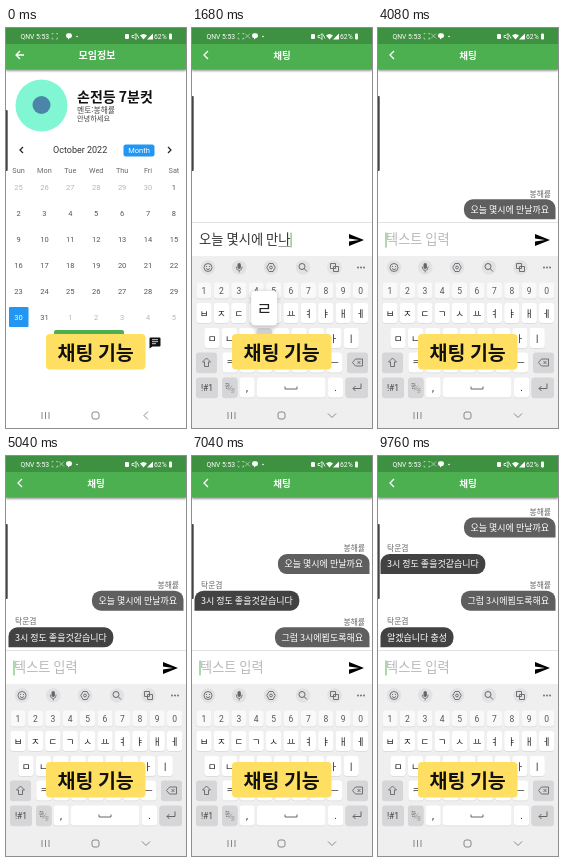
An HTML page with a canvas for the animation above (9.84 s loop, 180 px wide and 400 px high).

```html
<!DOCTYPE html>
<html lang="ko">
<head>
<meta charset="utf-8">
<style>
html, body { margin: 0; width: 100%; height: 100%; overflow: hidden; background: #fff; }
canvas { display: block; width: 180px; height: 400px; }
</style>
</head>
<body>
<canvas id="stage" width="180" height="400"></canvas>
<script>
const ctx = document.getElementById("stage").getContext("2d");
const LOOP = 9840, STEP = 80;
const KO = '"Noto Sans CJK KR", "Noto Sans CJK", sans-serif';
const LATIN = 'Roboto, "Noto Sans CJK KR", sans-serif';
const ME = "봉해률", PEER = "탁운겸";

const MESSAGES = [
  { at: 2240, me: true, text: "오늘 몇시에 만날까요" },
  { at: 4240, me: false, text: "3시 정도 좋을것같습니다" },
  { at: 6880, me: true, text: "그럼 3시에뵙도록해요" },
  { at: 9040, me: false, text: "알겠습니다 충성" }
];

// Drawing helpers
function text(str, x, y, size, color = "#222", { align = "left", weight = 400, font = KO } = {}) {
  ctx.font = `${weight} ${size}px ${font}`;
  ctx.textAlign = align;
  ctx.fillStyle = color;
  ctx.fillText(str, x, y + size * 0.37);
}
const center = (str, x, y, size, color, opts) => text(str, x, y, size, color, { align: "center", ...opts });
function box(x, y, w, h, color, radius = 0) {
  ctx.fillStyle = color;
  ctx.beginPath();
  ctx.roundRect(x, y, w, h, radius);
  ctx.fill();
}
function disc(x, y, r, color) {
  ctx.fillStyle = color;
  ctx.beginPath();
  ctx.arc(x, y, r, 0, 7);
  ctx.fill();
}
function path(d, x, y, color, width = 1, fill = false) {
  const shape = new Path2D(d);
  ctx.save();
  ctx.translate(x, y);
  ctx.lineWidth = width;
  ctx.strokeStyle = ctx.fillStyle = color;
  fill ? ctx.fill(shape) : ctx.stroke(shape);
  ctx.restore();
}
function shadow(color, blur, draw) {
  ctx.save();
  ctx.shadowColor = color;
  ctx.shadowBlur = blur;
  ctx.shadowOffsetY = 1;
  draw();
  ctx.restore();
}

// Hangul input: every key press with the text it leaves behind
const LEADS = "ㄱㄲㄴㄷㄸㄹㅁㅂㅃㅅㅆㅇㅈㅉㅊㅋㅌㅍㅎ";
const VOWELS = "ㅏㅐㅑㅒㅓㅔㅕㅖㅗㅘㅙㅚㅛㅜㅝㅞㅟㅠㅡㅢㅣ";
const TAILS = " ㄱㄲㄳㄴㄵㄶㄷㄹㄺㄻㄼㄽㄾㄿㅀㅁㅂㅄㅅㅆㅇㅈㅊㅋㅌㅍㅎ";
const syllable = n => String.fromCharCode(0xac00 + n);

function keystrokes(sentence) {
  const strokes = [];
  let done = "", prev = -1;
  for (const ch of sentence) {
    const code = ch.charCodeAt(0) - 0xac00;
    if (code < 0) {
      strokes.push({ key: ch, after: done + ch });
    } else {
      const lead = LEADS[Math.floor(code / 588)], tail = code % 28;
      const vowel = VOWELS[Math.floor(code % 588 / 28)], open = code - tail;
      const asTail = TAILS.indexOf(lead);
      const joins = prev >= 0 && prev % 28 === 0 && asTail > 0;
      strokes.push({ key: lead, after: joins ? done.slice(0, -1) + syllable(prev + asTail) : done + lead });
      if (vowel === "ㅚ") {
        strokes.push({ key: "ㅗ", after: done + syllable(open - 3 * 28) }, { key: "ㅣ", after: done + syllable(open) });
      } else {
        strokes.push({ key: vowel, after: done + syllable(open) });
      }
      if (tail) strokes.push({ key: TAILS[tail], after: done + ch });
    }
    done += ch;
    prev = code;
  }
  return strokes;
}
const TYPING = [
  { start: 800, pace: 45, end: MESSAGES[0].at, strokes: keystrokes(MESSAGES[0].text) },
  { start: 5200, pace: 52, end: MESSAGES[2].at, strokes: keystrokes(MESSAGES[2].text) }
];
function typed(t) {
  const run = TYPING.find(r => t >= r.start && t < r.end);
  if (!run) return { value: "", key: null };
  const i = Math.floor((t - run.start) / run.pace);
  const last = run.strokes[Math.min(i, run.strokes.length) - 1];
  return { value: last ? last.after : "", key: run.strokes[i] ? run.strokes[i].key : null };
}

// Shared chrome
function header(title, chat) {
  shadow("#0006", 2, () => box(0, 0, 180, 41.5, "#4caf50"));
  box(0, 0, 180, 16, "#3f9142");
  text("QNV", 14.5, 8.5, 6.8, "#fff", { font: LATIN });
  text("5:53", 30, 8.5, 6.8, "#fff", { font: LATIN });
  const faint = "#ffffffb0";
  path("M0 1V0H1.5M4 0H5.5V1M5.5 4V5.5H4M1.5 5.5H0V4", 46, 5.5, faint, .7);
  if (chat) path("M0 0L5 5M5 0L0 5", 53, 5.5, faint, .7);
  box(60, 5.3, 6, 4.6, "#fff", 2.2);
  path("M0 0H3L0 2.5Z", 62, 9, "#fff", 1, true);
  disc(71, 8.5, .8, "#fff");
  box(119, 6, 4, 5, "#fff", 1);
  path("M0 2H2L4 0V6L2 4H0ZM5 1L7 5", 126, 5.5, "#fff", .8);
  path("M0 2Q3.5 -1 7 2L3.5 6Z", 134, 5.5, "#fff", 1, true);
  path("M0 6L6 0V6Z", 141, 5.5, "#fff", 1, true);
  text("62%", 148, 8.5, 6.8, "#fff", { font: LATIN });
  box(163, 5.5, 3, 6, "#fff", 1);
  center(title, chat ? 90 : 91, chat ? 27 : 27.5, chat ? 9.5 : 10, "#fff", { weight: 700 });
  path(chat ? "M4 -4L0 0L4 4" : "M4 -4L0 0L4 4M0 0H8", chat ? 12 : 10, 27, "#fff", 1.3);
}
function navigation(keyboardUp) {
  box(0, 376, 180, 24, keyboardUp ? "#efeff0" : "#fff");
  path("M0 0V7M3.5 0V7M7 0V7", 36, 384, "#888", 1);
  path("M2 0H5Q7 0 7 2V5Q7 7 5 7H2Q0 7 0 5V2Q0 0 2 0Z", 86, 384, "#888", 1);
  path(keyboardUp ? "M-4 -2L0 2L4 -2" : "M2 -4L-2 0L2 4", 140, 387.5, "#888", 1);
}
function edgeHandle(top) {
  box(0, top, 1.7, 143 - top, "#444", [0, 1, 1, 0]);
}
function caption() {
  box(40, 306, 99.5, 35.5, "#ffdf62", 4);
  center("채팅 기능", 89.7, 324.5, 19.5, "#111", { weight: 700 });
}

// Club page
function clubPage() {
  box(0, 0, 180, 400, "#fff");
  header("모임정보", false);
  disc(35.5, 77.5, 26, "#80f7d2");
  disc(35.5, 77, 9, "#4b86a8");
  text("손전등 7분컷", 71, 68.5, 14, "#111", { weight: 700 });
  text("멘토:" + ME, 71, 82, 7.8, "#444");
  text("안녕하세요", 71, 90, 7.2, "#444");

  path("M2 -3L-1 0L2 3", 15, 122, "#222", 1.2);
  path("M-2 -3L1 0L-2 3", 164, 122, "#222", 1.2);
  text("October 2022", 47, 122, 9, "#333", { font: LATIN });
  box(117.5, 116.5, 31, 12, "#2196f3", 2.5);
  center("Month", 133, 122.5, 7.5, "#fff", { font: LATIN });

  const column = i => 12.5 + i * 25.9;
  ["Sun", "Mon", "Tue", "Wed", "Thu", "Fri", "Sat"].forEach((day, i) =>
    center(day, column(i), 142, 7.3, "#666", { font: LATIN }));
  box(3, 279, 19.5, 20, "#2196f3", 1);
  for (let i = 0; i < 42; i++) {
    const date = new Date(2022, 8, 25 + i);
    const color = i === 35 ? "#fff" : date.getMonth() === 9 ? "#555" : "#b5b5b5";
    center(date.getDate(), column(i % 7), 159.5 + Math.floor(i / 7) * 26, 7.5, color, { font: LATIN });
  }
  box(48, 302, 70, 20, "#4caf50", 2);
  path("M1 0H10Q11 0 11 1V8Q11 9 10 9H3L0 11V1Q0 0 1 0Z", 143.5, 309.5, "#111", 1, true);
  path("M0 0H6M0 2H6M0 4H4", 146, 311.7, "#fff", .8);
  navigation(false);
  edgeHandle(82);
}

// Keyboard
const KEY_ROWS = [
  { chars: "1234567890", x: 12, y: 262.5, h: 16 },
  { chars: "ㅂㅈㄷㄱㅅㅛㅕㅑㅐㅔ", x: 12, y: 285, h: 20 },
  { chars: "ㅁㄴㅇㄹㅎㅗㅓㅏㅣ", x: 20, y: 310, h: 20 },
  { chars: "ㅋㅌㅊㅍㅠㅜㅡ", x: 38, y: 334.5, h: 20 }
];
const PITCH = 17.4, KEY_W = 15.2;

function keyCap(x, y, w, h, color = "#fff") {
  box(x, y + .7, w, h, "#d8d8d8", 3);
  box(x, y, w, h, color, 3);
}
function keyboard(pressed) {
  const grey = "#d6d6d8", ink = "#666", down = "#d0d0d2";
  box(0, 228, 180, 172, "#efeff0");

  for (const x of [16, 47.2, 79, 111, 142.5]) disc(x, 239.5, 7.3, "#e2e2e4");
  path("M-4 0A4 4 0 1 0 4 0A4 4 0 1 0 -4 0M-2 1Q0 3.5 2 1M-1.5 -1.5V-.5M1.5 -1.5V-.5", 16, 239.5, ink, .9);
  box(45.5, 235, 3.4, 6, ink, 1.7);
  path("M-3 -1Q-3 3 0 3Q3 3 3 -1M0 3V5", 47.2, 239.5, ink, .8);
  path("M-2 -4H2L4.2 0L2 4H-2L-4.2 0ZM-1.4 0A1.4 1.4 0 1 0 1.4 0A1.4 1.4 0 1 0 -1.4 0", 79, 239.5, ink, .9);
  path("M-4 -1A3 3 0 1 0 2 -1A3 3 0 1 0 -4 -1M1.2 1.2L4 4", 111, 239.5, ink, 1);
  path("M-4 -4H1V1H-4ZM-1 -1H4V4H-1Z", 142.5, 239.5, ink, .9);
  for (const x of [166, 169, 172]) disc(x, 239.5, .9, ink);

  let popup = null;
  for (const { chars, x, y, h } of KEY_ROWS) {
    const digits = h < 20;
    [...chars].forEach((ch, i) => {
      const cx = x + i * PITCH;
      const held = pressed === ch || (pressed === "ㄲ" && ch === "ㄱ");
      keyCap(cx - KEY_W / 2, y - h / 2, KEY_W, h, held ? down : digits ? "#f9f9f9" : "#fff");
      center(ch, cx, y, digits ? 8.5 : 9.5, digits ? "#555" : "#222", { font: digits ? LATIN : KO });
      if (held) popup = { x: cx, y: y - 29.5 };
    });
  }
  keyCap(4, 324.5, 21, 20, grey);
  path("M0 -4.5L4 -.5H2V4H-2V-.5H-4Z", 14.5, 334.5, ink, .9);
  keyCap(155, 324.5, 21, 20, grey);
  path("M-5 0L-2 -3.5H5V3.5H-2ZM0 -1.5L3 1.5M3 -1.5L0 1.5", 165.5, 334.5, ink, .9);

  keyCap(4, 349.5, 22, 20, grey);
  center("!#1", 15, 359.5, 8.5, "#444", { font: LATIN });
  keyCap(30, 349.5, 15.5, 20, grey);
  center("한", 35.5, 357.5, 5.5, "#555");
  center("영", 40.5, 362, 5, "#888");
  path("M0 5L4 0", 36.2, 357.5, "#888", .6);
  keyCap(47.5, 349.5, 15.2, 20);
  center(",", 55, 359.5, 10, "#222", { font: LATIN });
  keyCap(65, 349.5, 68.5, 20, pressed === " " ? down : "#fff");
  path("M0 0V2.5H12V0", 93, 358.5, ink, 1);
  keyCap(136, 349.5, 15.2, 20);
  center(".", 143.5, 359, 10, "#222", { font: LATIN });
  keyCap(153.5, 349.5, 22.5, 20, grey);
  path("M4 -4V1H-4M-1.5 -1.5L-4 1L-1.5 3.5", 165, 359.5, ink, 1);

  if (popup) {
    shadow("#0004", 4, () => box(popup.x - 13, popup.y - 17.5, 26, 34.5, "#fff", 4));
    center(pressed, popup.x, popup.y, 17, "#222", { font: pressed < "a" ? LATIN : KO });
  }
}

// Chat page
function bubble({ me, text: words }, y) {
  ctx.font = `500 9px ${KO}`;
  const w = ctx.measureText(words).width + 13;
  const x = me ? 177.5 - w : 2.5;
  text(me ? ME : PEER, me ? 173 : 9, y - (me ? 5.5 : 6), 7.8, "#666", { align: me ? "right" : "left" });
  box(x, y, w, 20, me ? "#5f5f5f" : "#424242", me ? [9, 9, 0, 9] : [9, 9, 9, 0]);
  text(words, x + 6.5, y + 10, 9, "#fff", { weight: 500 });
}
function inputBar(value) {
  box(0, 194, 180, 34, "#fff");
  box(0, 194, 180, 1, "#e2e2e2");
  let caret = 7.5;
  if (value) {
    text(value, 7, 211.5, 13.3, "#333");
    caret = 7 + ctx.measureText(value).width;
    if (value.slice(-1) > "ㄱ") box(caret - 12.2, 218, 12, .7, "#777");
  } else {
    text("텍스트 입력", 8, 211.5, 13.2, "#b8b8b8");
  }
  box(caret, 204.5, 1, 15, "#58b55c");
  path("M0 0L15 6L0 12V7.5L10 6L0 4.5Z", 157, 206, "#000", 1, true);
}
function chatPage(t) {
  const rise = Math.min(1, Math.max(0, (t - 560) / 160));
  const drop = 148 * (1 - rise) ** 2;
  const { value, key } = typed(t);
  box(0, 0, 180, 400, "#fff");
  const shown = MESSAGES.filter(m => m.at <= t);
  shown.forEach((m, i) => bubble(m, 171.3 - (shown.length - 1 - i) * 36.6));
  header("채팅", true);
  ctx.save();
  ctx.translate(0, drop);
  inputBar(value);
  keyboard(key);
  ctx.restore();
  navigation(rise > 0);
  edgeHandle(68);
}

function draw(now) {
  const t = Math.floor(now % LOOP / STEP) * STEP;
  const enter = Math.min(1, Math.max(0, (t - 240) / 240));
  if (enter < 1) clubPage();
  if (enter > 0) {
    ctx.save();
    ctx.globalAlpha = enter;
    ctx.translate(0, 30 * (1 - enter) ** 2);
    chatPage(t);
    ctx.restore();
  }
  caption();
}

let begin;
function tick(now) {
  begin ??= now;
  draw(now - begin);
  requestAnimationFrame(tick);
}
draw(0);
requestAnimationFrame(tick);
</script>
</body>
</html>
```
